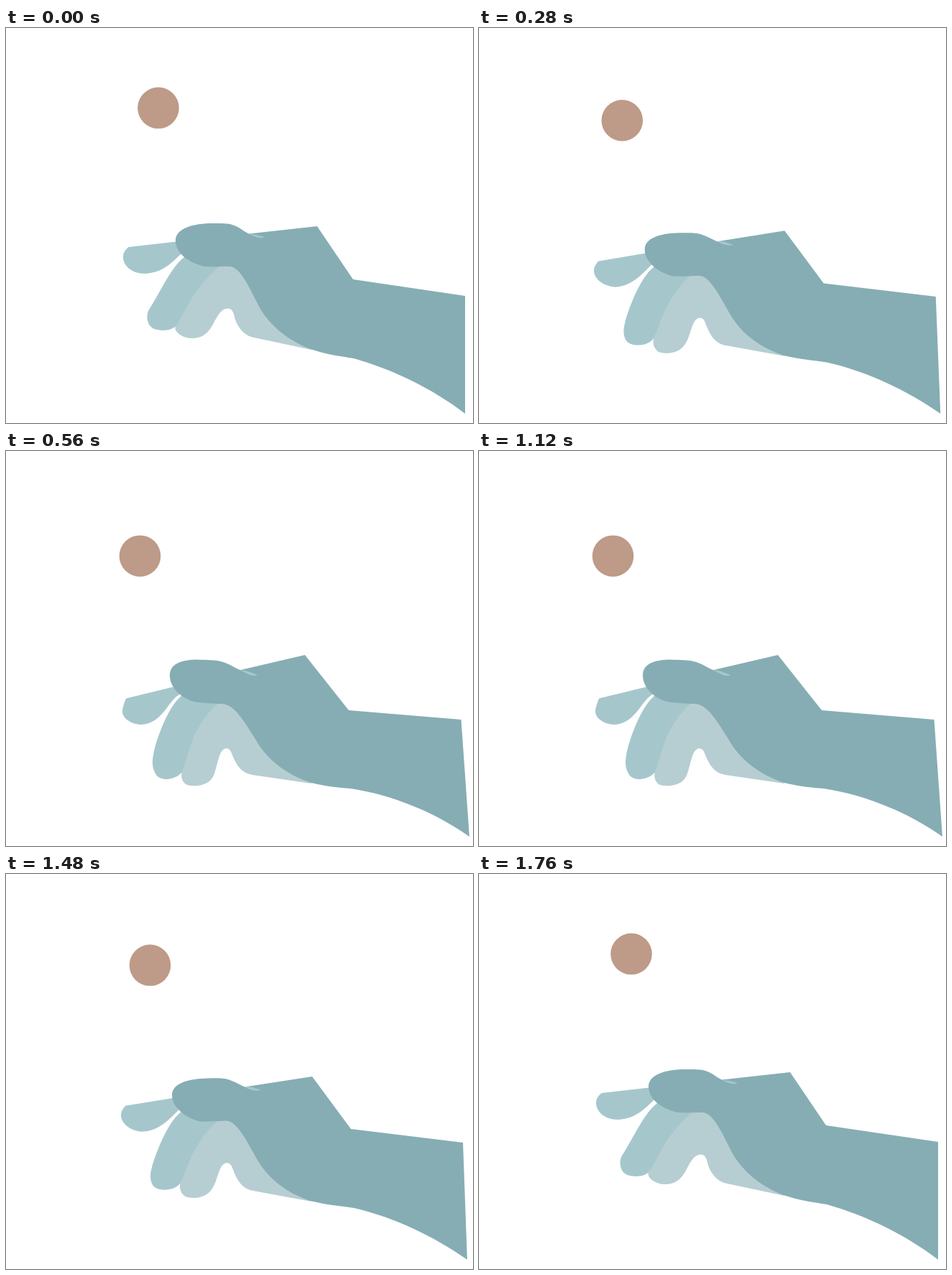
An HTML page with a canvas for the animation above (5000 ms loop, 650 by 550 pixels).

```html
<!DOCTYPE html>
<html lang="en">
<head>
<meta charset="utf-8">
<title>Hand and ball</title>
<style>
html, body { margin: 0; width: 100%; height: 100%; overflow: hidden; background: #fff; }
canvas { display: block; }
</style>
</head>
<body>
<canvas id="stage" width="650" height="550"></canvas>
<script>
const ctx = document.getElementById('stage').getContext('2d');
const LOOP = 5000, STEP = 40, MID = 0.457;

// Each shape has a raised, a middle and a lowered pose.
const shapes = [
  { fill: '#a5c7cc', poses: [
    'M170.5 305 L250 296 L250 310 L243 315 C230 328 217 341 193 342 C174 342 163 330 163 319 C163 312 167 308 170.5 305 Z',
    'M166 323 L246 310 L246 324 L240 329 C227 342 213 358 190 359 C172 358 160 347 160 336 C160 330 164 326 166 323 Z',
    'M167 344.5 L243 326 L243 337 L240 340 C226 348 217 380 188 381 C172 380 162 371 162 363 C162 357 165 350 167 344.5 Z'] },
  { fill: '#a5c7cc', poses: [
    'M255 310 L247 320 C231 332 216 365 201 389 C196 396 196 402 197 407 C199 418 208 421 219 421 C228 421 234 418 240 412 L270 375 L302 333 L302 320 Z',
    'M252 322 L243 332 C224 347 207 393 203 409 C200 419 201 425 203 431 C206 438 213 440 222 440 C234 439 240 436 246 426 L270 385 L302 345 L302 332 Z',
    'M252 330 L243 342 C224 358 207 408 205 424 C203 434 204 441 207 447 C210 455 217 457 224 457 C236 456 242 451 247 445 L268 395 L302 352 L302 340 Z'] },
  { fill: '#b6ced2', poses: [
    'M296 333 C284 342 266 363 257 379 C249 392 243 407 236 415 C234 420 238 424 242 427 C248 431 254 432.5 261 432 C277 431 284 421 290 409 C296 398 300 391 309 390.5 C316 391 317 398 319 406 C324 420 334 429 345 431 L425 448 L400 390 L340 333 L310 325 Z',
    'M294 345 C281 354 268 374 260 390 C252 406 248 422 242.5 431 C241 440 244 445 249 449 C254 451 259 451.5 266 451 C280 449 287 442 292 428 C297 414 299 403 308 402.5 C314 403 315 410 318 417 C324 431 332 440 345 441.5 L425 456 L400 400 L340 345 L310 336 Z',
    'M295 352 C282 361 268 383 261 399 C253 418 251 434 245 446 C243 453 245 460 250 464 C254 466 260 466.5 267 466 C282 464 288 457 291 446 C296 431 297 415 307 414 C314 415 314 423 318 430 C324 443 332 449 343 451 L425 463 L400 410 L340 352 L310 342 Z'] },
  { fill: '#86adb4', poses: [
    'M236 296 C236 279 260 272 288 272 C300 272 309 272 315 274 C325 277 330 283 338 286.5 L433 276 L483 350 L639 373 L639 537 C595 503 540 476 484 460 C465 457 448 455 425 447.5 C394 436 369 416 354 391 C341 367 327 332 311 332 C297 332 288 333 277 332 C257 328 236 315 236 296 Z',
    'M231 308 C231 292 252 285 280 284.5 C294 284.5 304 284 311 287 C320 290 326 294 332 296.5 L426 282 L480 355 L636 374 L642 537 C595 504 540 478 484 465 C465 462 448 461 425 455.5 C392 445 366 425 351 400 C337 376 322 344 307 344 C293 344 285 345 272 345 C251 341 231 325 231 308 Z',
    'M228 313 C228 296 244 290.5 267 290.5 C281 291 291 291 299 293 C311 296 318 302 326 305 L416 284 L477 361 L633.5 374 L645 537 C600 505 540 479 480 470 C463 469 446 467 425 462 C391 451 363 430 347 401 C332 377 318 353 301 352 C288 352 279 351 267 350 C246 347 228 330 228 313 Z'] },
  { fill: '#a5c7cc', poses: [
    'M338 286.5 C345 287 352 289 360 291 C354 294 346 291 338 286.5 Z',
    'M332 296.5 C341 295 347 299 355 301 C349 303 340 301 332 296.5 Z',
    'M326 305 C335 305 342 309 350 312 C344 315 335 310 326 305 Z'] }
];
const ball = { r: 28.8, from: [212, 111.3], to: [186.5, 146.2] };

const split = path => path.match(/[A-Z]|[\d.]+/g);
for (const s of shapes) s.poses = s.poses.map(split);

const mix = (a, b, p) => a + (b - a) * p;

// Quadratic through all three poses.
function blend([a, m, b], p) {
  const wa = (p - MID) * (p - 1) / MID;
  const wm = p * (p - 1) / (MID * (MID - 1));
  const wb = p * (p - MID) / (1 - MID);
  return a.map((v, i) => isNaN(v) ? v : (v * wa + m[i] * wm + b[i] * wb).toFixed(2)).join(' ');
}

function ease(t, start, end) {
  const u = Math.min(1, Math.max(0, (t - start) / (end - start)));
  return mix(u, u * u * (3 - 2 * u), 0.4);
}

function draw(t) {
  const p = ease(t, 0, 560) - ease(t, 1150, 1760);
  ctx.fillStyle = '#fff';
  ctx.fillRect(0, 0, 650, 550);
  for (const s of shapes) {
    ctx.fillStyle = s.fill;
    ctx.fill(new Path2D(blend(s.poses, p)));
  }
  ctx.fillStyle = '#be9a88';
  ctx.beginPath();
  ctx.arc(mix(ball.from[0], ball.to[0], p), mix(ball.from[1], ball.to[1], p), ball.r, 0, Math.PI * 2);
  ctx.fill();
}

const began = performance.now();
function tick() {
  const t = (performance.now() - began) % LOOP;
  draw(Math.floor(t / STEP) * STEP);
  requestAnimationFrame(tick);
}
tick();
</script>
</body>
</html>
```
